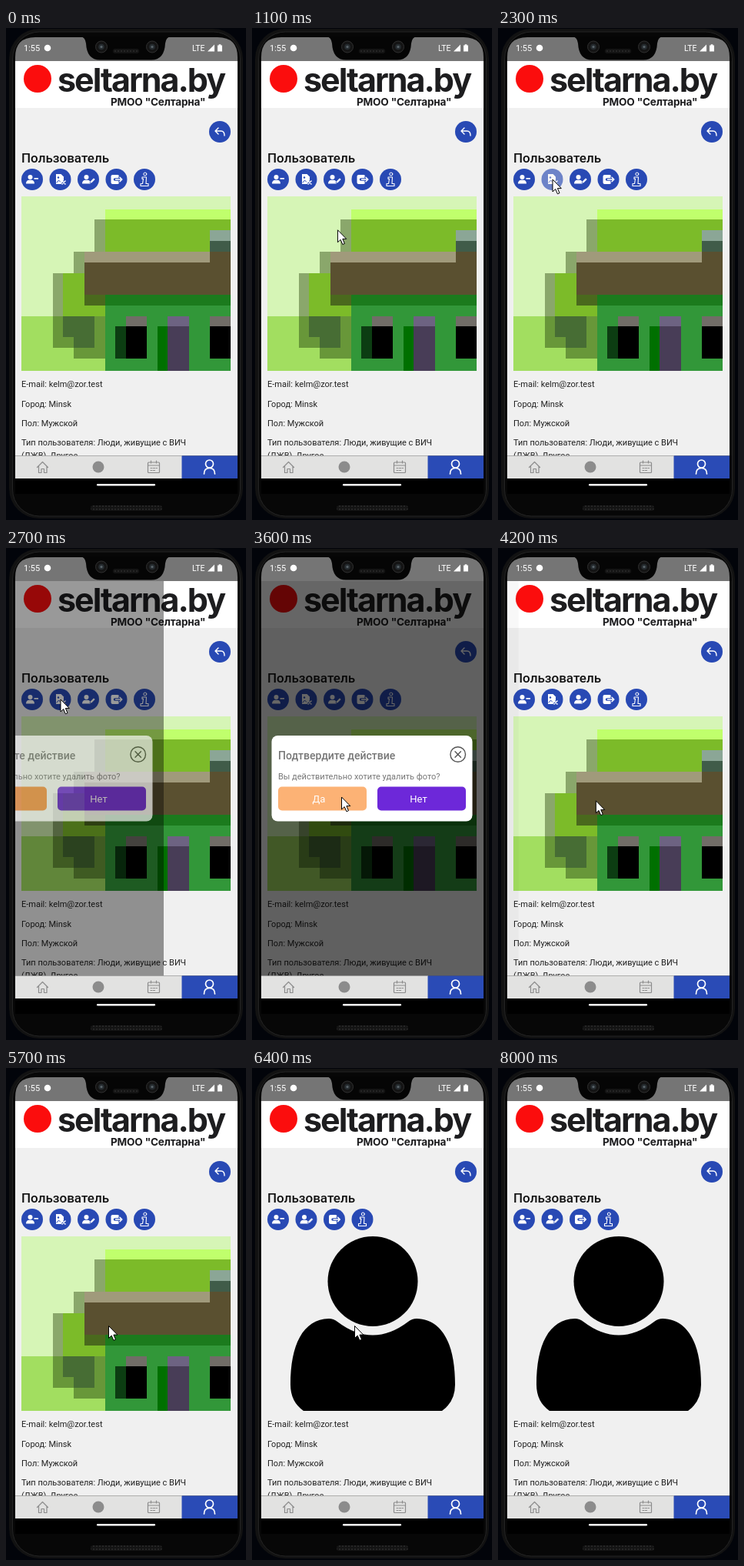
An HTML page for the animation above (8.7 s loop, 312 by 640 pixels).

```html
<!DOCTYPE html>
<html lang="ru">
<head>
<meta charset="utf-8">
<style>
html, body { margin: 0; width: 100%; height: 100%; overflow: hidden; background: #000; }
svg { display: block; width: 312px; height: 640px; font-family: Roboto, sans-serif; }
.brand { font-family: Inter, sans-serif; font-weight: 700; }
.line { fill: none; stroke-linecap: round; stroke-linejoin: round; }
</style>
</head>
<body>
<svg viewBox="0 0 312 640">
  <defs>
    <clipPath id="screen"><path d="M12 606V38Q12 12 38 12H275Q301 12 301 38V606Z"/></clipPath>
    <clipPath id="page"><rect x="12" y="43" width="289" height="513.500"/></clipPath>
    <pattern id="mesh" width="4" height="4" patternUnits="userSpaceOnUse">
      <rect width="4" height="4" fill="#141414"/><circle cx="2" cy="2" r="1" fill="#2c2c2c"/>
    </pattern>
  </defs>

  <!-- phone body -->
  <rect width="312" height="640" fill="#02040a"/>
  <rect x="4" y="1" width="304" height="637" rx="39" fill="#121212"/>
  <rect x="8.500" y="5" width="296" height="630" rx="35" fill="#070707" stroke="#242424"/>

  <!-- screen -->
  <g clip-path="url(#screen)">
    <rect x="12" y="12" width="289" height="594" fill="#000"/>
    <rect x="12" y="12" width="289" height="31" fill="#757575"/>
    <g fill="#fff">
      <text x="23" y="30" font-size="11">1:55</text>
      <circle cx="54" cy="26" r="4.300"/>
      <text x="242" y="30" font-size="10.500">LTE</text>
      <path d="M271 21.500V30.500H262Z"/>
      <path d="M275 22.500h1.700v-1.300h2.600v1.300h1.700v8h-6Z"/>
    </g>
    <g clip-path="url(#page)">
      <rect x="12" y="43" width="289" height="514" fill="#f0f0f0"/>
      <rect x="12" y="43" width="289" height="61" fill="#fff"/>
      <circle cx="41" cy="66" r="18" fill="#fb0d0d"/>
      <g class="brand" fill="#1d1d1f">
        <text x="67" y="83" font-size="43" letter-spacing="-2">seltarna.by</text>
        <text x="136" y="101" font-size="13.600" letter-spacing="-.2">РМОО "Селтарна"</text>
      </g>
      <text x="20" y="175" font-size="17" font-weight="500" fill="#111">Пользователь</text>
      <circle cx="278" cy="135" r="14" fill="#2849b4"/>
      <path class="line" d="M276 130l-4 4 4 4M272.500 134h7q4.500 0 4.500 6" stroke="#fff" stroke-width="1.400"/>
      <g id="tools"></g>
      <g id="photo" shape-rendering="crispEdges"></g>
      <g id="avatar">
        <circle cx="157" cy="277.500" r="58.500"/>
        <path d="M67 446Q50 434 50 412C50 360 66 327 100 326Q106 326 111 330Q157 365 203 330Q208 326 214 326C248 327 264 360 264 412Q264 434 247 446Z"/>
      </g>
      <g font-size="11" fill="#222" id="info"></g>
      <g id="modal">
        <rect id="shade" x="12" y="43" width="289" height="514"/>
        <g id="dialog">
          <rect x="25.500" y="244" width="261" height="111.500" rx="8" fill="#fff"/>
          <g fill="#777">
            <text x="34" y="274.500" font-size="14" font-weight="500">Подтвердите действие</text>
            <text x="34" y="300.500" font-size="11">Вы действительно хотите удалить фото?</text>
          </g>
          <path class="line" d="M277.500 268.500a9.800 9.800 0 1 0-19.600 0a9.800 9.800 0 1 0 19.600 0M264 264.800l7.400 7.400M271.400 264.800l-7.400 7.400" stroke="#555" stroke-width="1.400"/>
          <g font-size="13" fill="#fff" text-anchor="middle">
            <g id="yes"><rect x="34" y="310.500" width="115" height="31" rx="5" fill="#fb923c"/><text x="87" y="331">Да</text></g>
            <rect x="163" y="310.500" width="115" height="31" rx="5" fill="#6d28d9"/><text x="216.500" y="331">Нет</text>
          </g>
        </g>
      </g>
    </g>

    <!-- tab bar -->
    <rect x="12" y="556.500" width="217" height="29.500" fill="#e2e2e1"/>
    <rect x="228.500" y="556.500" width="73" height="29.500" fill="#2a4bb6"/>
    <g class="line" stroke="#8c8c8c" stroke-width="1.200">
      <path d="M40.500 571.500l7-7 7 7M42.500 570v8.500h3.500v-5h3.500v5h3.500v-8.500"/>
      <rect x="184.500" y="565" width="15" height="13.500" rx="1"/>
      <path d="M184.500 569h15M188.500 563v3M195.500 563v3M188 572.500h2M191.500 572.500h2M195 572.500h1.500M188 575.500h2M191.500 575.500h2"/>
    </g>
    <circle cx="120" cy="571" r="7.500" fill="#8c8c8c"/>
    <g class="line" stroke="#fff" stroke-width="1.700">
      <circle cx="264.500" cy="567" r="5"/>
      <path d="M257.500 580Q257.500 572.500 264.500 572.500T271.500 580"/>
    </g>
    <rect x="118" y="593" width="76" height="2.600" rx="1.300" fill="#fff"/>
  </g>

  <!-- notch and speakers -->
  <path d="M97 11Q103 12 104 20Q105 41.500 122 41.500H189Q206 41.500 207 20Q208 12 214 11Z" fill="#050505"/>
  <g id="lenses"></g>
  <rect x="139" y="27" width="34" height="6" rx="3" fill="url(#mesh)"/>
  <rect x="110" y="621" width="93" height="7" rx="3.500" fill="url(#mesh)"/>

  <path id="cursor" d="M0 0V16L3.700 12.600 6.400 18.800 9 17.700 6.400 11.600H11.300Z" fill="#fff" stroke="#000" stroke-width="1" stroke-linejoin="round"/>
</svg>

<script>
const $ = id => document.getElementById(id);
const LOOP = 8700, STEP = 100;

// Picture: cells of a coarse grid as column, row, width, height, fill
const CW = 13.6, CH = 13.9, X0 = 20, Y0 = 235.5;
const cells = [
  [0, -2, 20, 18, '#d6f5b6'],
  [0, 10, 8, 6, '#a2de60'],
  [8, 0, 12, 1, '#c0ff6c'],
  [8, 1, 12, 4, '#7cbb29'],
  [7, 1, 1, 3, '#8aa76b'],
  [5, 4, 1, 2, '#8aa76b'],
  [4, 6, 4, 4, '#7cbb29'],
  [3, 6, 1, 4, '#8aa76b'],
  [3, 10, 1, 3, '#689739'],
  [4, 12, 1, 1, '#689739'],
  [5, 13, 2, 1, '#689739'],
  [4, 10, 3, 2, '#476d34'],
  [5, 12, 2, 1, '#476d34'],
  [7, 10, 1, 4, '#689739'],
  [6, 4, 14, 1, '#a09a7b'],
  [6, 5, 14, 3, '#5a5030'],
  [18, 2, 2, 1, '#8ba696'],
  [18, 3, 2, 1, '#405c49'],
  [18, 4, 2, 1, '#5a5030'],
  [6, 8, 2, 1, '#4a691d'],
  [8, 8, 12, 1, '#1b7b1d'],
  [8, 9, 12, 7, '#329739'],
  [9, 11, 1, 3, '#0c3d12'],
  [10, 10, 2, 1, '#716d67'],
  [10, 11, 2, 3, '#000'],
  [13, 11, 1, 5, '#007000'],
  [14, 10, 2, 1, '#6d6382'],
  [14, 11, 2, 5, '#483d57'],
  [18, 10, 2, 1, '#716d67'],
  [18, 11, 2, 3, '#000']
];
$('photo').innerHTML = cells.map(([c, r, w, h, fill]) => {
  const top = Math.max(219, Y0 + r * CH), bottom = Math.min(446, Y0 + (r + h) * CH);
  return `<rect x="${X0 + c * CW}" y="${top}" width="${w * CW}" height="${bottom - top}" fill="${fill}"/>`;
}).join('');

const lines = ['E-mail: kelm@zor.test', 'Город: Minsk', 'Пол: Мужской', 'Тип пользователя: Люди, живущие с ВИЧ'];
$('info').innerHTML = lines.map((s, i) => `<text x="20" y="${467.3 + i * 25.2}">${s}</text>`).join('') +
  '<text x="20" y="559.500">(ЛЖВ), Другое</text>';

$('lenses').innerHTML = [124, 190].map(x =>
  `<circle cx="${x}" cy="24.500" r="7.500" fill="#141414" stroke="#303030"/>
   <circle cx="${x}" cy="24.500" r="3.800" fill="#262c30"/><circle cx="${x}" cy="24.500" r="1.600" fill="#59646a"/>`).join('');

// Round tool buttons, drawn around their centre
const person = '<circle cx="-2.500" cy="-3" r="3"/><path d="M-8 5.500Q-8 .8-3.500 .8H-1.500Q3 .8 3 5.500Z"/>';
const blue = '#2849b4';
const icons = [
  person + '<rect x="2.500" y="-2" width="5.500" height="1.700"/>',
  `<path d="M-5.500-7H1L4.500-3.500V1L1 6H-5.500Z"/><circle cx="-2.500" cy="-2.500" r="1.200" fill="${blue}"/>
   <path d="M-4.500 4l2.500-3 2 2" class="line" stroke="${blue}"/><path d="M2.500 2l4 4M6.500 2l-4 4" class="line" stroke="#fff" stroke-width="1.600"/>`,
  person + `<path d="M2 5l.5-2.500 4.500-4.500 2 2-4.500 4.500Z" stroke="${blue}" stroke-width=".6"/>`,
  `<rect x="-7" y="-6" width="10.500" height="12" rx="2"/><path d="M-2 0H7M4.500-3l3 3-3 3" class="line" stroke="${blue}" stroke-width="3.500"/>
   <path d="M-1 0H7M4.500-2.800l2.800 2.800-2.800 2.800" class="line" stroke="#fff" stroke-width="1.500"/>`,
  '<circle cx=".8" cy="-7" r="2" class="line" stroke="#fff"/><path d="M-3-3H2.500L2 5.500H5V8.500H-5V5.500H-2.500L-1.500-.8H-3Z" class="line" stroke="#fff" stroke-width="1.100"/>'
];
$('tools').innerHTML = icons.map(s => `<g fill="#fff"><circle r="14" fill="${blue}"/>${s}</g>`).join('');
const tools = [...$('tools').children];

const clamp = v => Math.min(1, Math.max(0, v));
const part = (t, a, b) => clamp((t - a) / (b - a));
const smooth = p => p * p * (3 - 2 * p);
const slowDown = p => 1 - (1 - p) ** 2;
const show = (el, on) => el.setAttribute('visibility', on ? 'visible' : 'hidden');
const fade = (el, v) => el.setAttribute('opacity', v);
const move = (el, x, y) => el.setAttribute('transform', `translate(${x} ${y})`);

// Pointer moves: start, end, x, y, easing
const moves = [
  [700, 1400, 71, 197, slowDown],
  [2800, 3300, 116.5, 324, smooth],
  [3700, 4400, 130, 330, smooth],
  [5100, 5600, 133.5, 335.5, smooth],
  [7800, 7900, 24, 324, smooth]
];
const pointer = t => moves.reduce(([px, py], [a, b, x, y, ease]) => {
  const p = ease(part(t, a, b));
  return [px + (x - px) * p, py + (y - py) * p];
}, [291, 555]);

function render(t) {
  const removed = t >= 6100;
  show($('photo'), !removed);
  show($('avatar'), t >= 6400);

  tools.forEach((el, i) => move(el, 34 + 36.5 * (removed && i > 1 ? i - 1 : i), 197));
  show(tools[1], !removed);
  fade(tools[1], t >= 2300 && t < 2500 ? .65 : 1);

  // The dialog and its backdrop slide in from the left and back out
  const open = part(t, 2500, 2800) - part(t, 3800, 4220);
  fade($('shade'), .6 * open);
  fade($('dialog'), open);
  move($('modal'), 288 * (open - 1), 0);
  fade($('yes'), t >= 3500 && t < 3800 ? .7 : 1);

  show($('cursor'), t >= 700 && t < 8000);
  move($('cursor'), ...pointer(t));
}

const start = performance.now();
function tick() {
  const t = (performance.now() - start) % LOOP;
  render(Math.floor(t / STEP) * STEP);
  requestAnimationFrame(tick);
}
tick();
</script>
</body>
</html>
```
